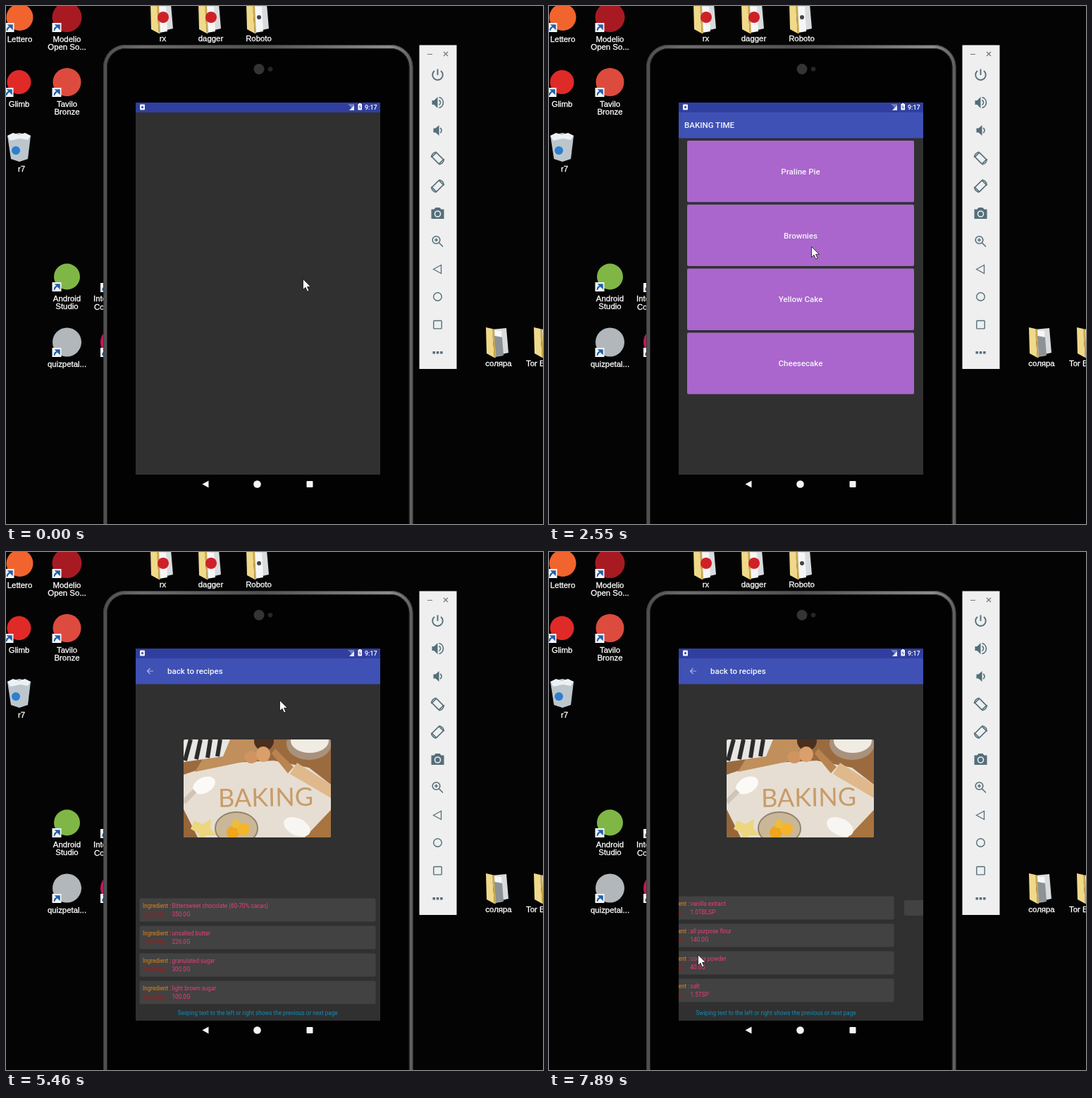
Write an HTML page that moves like this. It is 762 by 735 pixels and loops after 8000 ms.

```html
<!DOCTYPE html>
<html lang="en">
<head>
<meta charset="utf-8">
<title>Baking app in an emulator</title>
<style>
  html, body { margin: 0; width: 100%; height: 100%; overflow: hidden; background: #040404; }
  svg { display: block; }
  text { font-family: Roboto, sans-serif; }
  .mid { text-anchor: middle; }
  .label { font: 11.4px "Liberation Sans", Arial, sans-serif; fill: #fff; stroke: #fff; stroke-width: .3; }
  .title { font-size: 11.56px; font-weight: 500; fill: #f4f4f8; }
  .bold { font-weight: 700; }
  .small { font-size: 8.15px; }
  .tools { fill: none; stroke: #546e7a; stroke-width: 1.6; }
  .solid { fill: #546e7a; stroke: none; }
</style>
</head>
<body>
<svg width="762" height="735" viewBox="0 0 762 735">
  <defs>
    <linearGradient id="rim" x2="1" y2="0">
      <stop offset="0" stop-color="#505050"/><stop offset=".12" stop-color="#6c6c6c"/>
      <stop offset=".5" stop-color="#505050"/><stop offset=".93" stop-color="#8c8c8c"/><stop offset="1" stop-color="#626262"/>
    </linearGradient>
    <clipPath id="screenClip"><rect x="184" y="137" width="347" height="532"/></clipPath>
    <clipPath id="listClip"><rect x="184" y="486" width="347" height="157"/></clipPath>
    <clipPath id="photoClip"><rect x="252" y="266" width="209" height="139" rx="3"/></clipPath>
    <g id="shortcut">
      <rect width="13" height="13" fill="#f4f6f8"/>
      <path d="M3 11C3 7 5 5.500 7.500 5.500M5 3H10.500V8.500Z" fill="#1f5fa8" stroke="#1f5fa8" stroke-width="1.500"/>
    </g>
    <g id="folder">
      <path d="M8 0L29 -2L32 33L14 37Z" fill="#d9dcde"/>
      <path d="M10 1L22 2L24 37L12 39Z" fill="#f6f6f6"/>
      <path d="M0 -3L9 -1L12 40L1 34Z" fill="#f0d98a"/>
      <path d="M9 -1L12 0L14 40L12 40Z" fill="#c9a94f"/>
    </g>
  </defs>

  <rect width="762" height="735" fill="#040404"/>
  <g id="desktop"></g>

  <!-- device -->
  <rect x="140.500" y="57.500" width="434.500" height="760" rx="29" fill="#020202" stroke="url(#rim)" stroke-width="5"/>
  <rect x="143.500" y="60.500" width="428.500" height="760" rx="26" fill="none" stroke="#252525"/>
  <rect x="138.500" y="55.500" width="438.500" height="760" rx="31" fill="none" stroke="#393939"/>
  <circle cx="359" cy="89.500" r="7.500" fill="#343434"/>
  <circle cx="375" cy="89.500" r="3.300" fill="#262626"/>

  <g clip-path="url(#screenClip)">
    <rect x="184" y="137" width="347" height="18" fill="#303f9f"/>
    <g id="activity">
      <rect x="184" y="151" width="347" height="514" fill="#303030"/>
      <g id="bar">
        <rect x="184" y="151" width="347" height="36.500" fill="#3f51b5"/>
        <text id="homeTitle" class="title" x="192" y="173">BAKING TIME</text>
        <g id="backTitle">
          <path d="M209 169H200.500M204.500 165L200.500 169L204.500 173" fill="none" stroke="#a9b1dc" stroke-width="1.200"/>
          <text class="title" x="229" y="173">back to recipes</text>
        </g>
      </g>
      <g id="home"></g>
      <g id="steps"></g>
      <g id="detail">
        <g clip-path="url(#photoClip)">
          <rect x="252" y="266" width="209" height="139" fill="#e6ded3"/>
          <path d="M252 266H461V330L430 306L380 296L300 300L252 316Z" fill="#9b6b3f"/>
          <path d="M296 266H372L345 296L268 312Z" fill="#c08f5b"/>
          <path d="M252 266H318L308 290L252 298Z" fill="#e8e6e2"/>
          <path d="M262 266L254 296M276 266L270 294M290 266L286 292M304 266L300 290" stroke="#2c2b2b" stroke-width="6"/>
          <circle cx="366" cy="268" r="14" fill="#4a2f20"/>
          <ellipse cx="348" cy="291" rx="10" ry="9" fill="#cf945f"/><ellipse cx="365" cy="287" rx="10" ry="11" fill="#d9a06c"/>
          <ellipse cx="430" cy="272" rx="32" ry="23" fill="#a9927c"/><ellipse cx="431" cy="268" rx="27" ry="17" fill="#f0ebe3"/>
          <path d="M382 279L408 305L400 314L377 286Z" fill="#b98450"/>
          <path d="M413 299L461 330V349L403 315Z" fill="#dfb98b"/>
          <ellipse cx="281" cy="331" rx="17" ry="11" transform="rotate(-28 281 331)" fill="#fbfaf7"/>
          <path d="M268 339L252 355" stroke="#cfc4b6" stroke-width="7"/>
          <text x="301" y="361" font-size="36" transform="rotate(-1 365 350)" style="font-family:Lato,sans-serif" fill="#c89c68">BAKING</text>
          <path d="M461 366V405H424Z" fill="#a8743f"/><path d="M252 365L272 405H252Z" fill="#966539"/>
          <ellipse cx="413" cy="390" rx="20" ry="12" transform="rotate(25 413 390)" fill="#f8f6f3"/>
          <path d="M267 381L279 386L291 379L290 392L299 402L284 402L276 410L273 399L262 393Z" fill="#ecd680"/>
          <ellipse cx="327" cy="392" rx="30" ry="23" fill="#c9b797" stroke="#93836c" stroke-width="2"/>
          <circle cx="322" cy="398" r="9" fill="#f0a51c"/><circle cx="337" cy="393" r="9" fill="#f5b52a"/><circle cx="326" cy="386" r="6" fill="#efbb3c"/>
        </g>
        <g clip-path="url(#listClip)"><g id="ingredients"></g></g>
        <g id="pager">
          <text class="small mid" x="357" y="657" fill="#108db8">Swiping text to the left or right shows the previous or next page</text>
          <rect x="539" y="494" width="335" height="22" rx="3" fill="#424242"/>
        </g>
      </g>
    </g>
    <rect x="190" y="139.500" width="7" height="8" rx="1" fill="#eef0f8"/><circle cx="193.500" cy="143.500" r="1.500" fill="#303f9f"/>
    <path d="M485 139H494V148Z" fill="#6f7abc"/><path d="M487 148L494 141V148Z" fill="#e4e7f5"/>
    <path d="M499.500 139H501V138H503.500V139H505V147.500H499.500Z" fill="#fff"/>
    <path d="M502.500 140.500L501.300 143.500H503.300L502 146" fill="none" stroke="#303f9f" stroke-width=".8"/>
    <text x="509" y="146.500" font-size="9" font-weight="500" fill="#fff">9:17</text>
  </g>
  <g fill="#f4f4f4">
    <path d="M278.500 678.500L287.500 673.500V683.500Z"/><circle cx="356.500" cy="678.500" r="5.300"/><rect x="426.500" y="674" width="9" height="9" rx="1"/>
  </g>

  <!-- emulator controls -->
  <rect x="586.500" y="55.500" width="53" height="459.500" fill="#efefef"/>
  <path d="M598 68.500H605M621 65L627 71M627 65L621 71" stroke="#6b7a82" stroke-width="1.200"/>
  <g class="tools" transform="translate(612.500 0)">
    <path d="M-4.500 92A7.300 7.300 0 1 0 4.500 92M0 89.500V98" stroke-width="1.900"/>
    <path class="solid" d="M-8 134H-5L0 129V145L-5 140H-8Z"/>
    <path d="M2 133.500A4 4 0 0 1 2 140.500M2 129.500A7.700 7.700 0 0 1 2 144.500"/>
    <path class="solid" d="M-6 173.500H-3L2 169V184L-3 179.500H-6Z"/>
    <path d="M3.500 173A4 4 0 0 1 3.500 180"/>
    <g id="rotate">
      <rect x="-4.500" y="-7" width="9" height="14" rx="1" transform="translate(0 216) rotate(-45)"/>
      <path d="M-9 215A9 9 0 0 1 -2 207M9 217A9 9 0 0 1 2 225"/>
    </g>
    <use href="#rotate" transform="translate(0 39.500) matrix(-1 0 0 1 0 0)"/>
    <path class="solid" d="M-9 288.500H-5L-3 286H3L5 288.500H9V302H-9Z"/>
    <circle cy="295" r="4" fill="#546e7a" stroke="#efefef"/>
    <circle cx="-2" cy="332" r="5.300"/><path d="M2 336L7.500 341.500M-4.500 332H.5M-2 329.500V334.500"/>
    <path d="M-6 373.500L5 367.500V379.500Z" stroke-width="1.300"/><circle cy="412.500" r="5.800" stroke-width="1.400"/>
    <rect x="-5.700" y="446.500" width="11.400" height="11.400" rx="1" stroke-width="1.400"/>
    <path class="solid" d="M-7 490h3.500v3.500h-3.500zM-1.700 490h3.500v3.500h-3.500zM3.600 490h3.500v3.500h-3.500z"/>
  </g>

  <path id="cursor" d="M.5 .5V15.500L4 12.200L6.500 18L9 17L6.500 11.300H11.300Z" fill="#fff" stroke="#111" stroke-width=".8"/>
</svg>
<script>
const el = id => document.getElementById(id);
const show = (id, on) => el(id).style.display = on ? '' : 'none';
const text = (x, y, cls, s, fill = '#f5f5f5') => `<text x="${x}" y="${y}" class="${cls}" fill="${fill}">${s}</text>`;
const rect = (x, y, w, h, fill) => `<rect x="${x}" y="${y}" width="${w}" height="${h}" rx="2" fill="${fill}"/>`;
const use = (id, x, y) => `<use href="#${id}" x="${x}" y="${y}"/>`;
const label = (x, y, ...lines) => lines.map((s, i) => text(x, y + i * 11.5, 'label mid', s)).join('');
const disc = (x, y, r, fill) => `<circle cx="${x}" cy="${y}" r="${r}" fill="${fill}"/>`;
const app = (x, y, r, fill, ...lines) =>
  disc(x, y, r, fill) + use('shortcut', x - 21, y + 8) + label(x, y + 34.500, ...lines);

el('desktop').innerHTML =
  app(19.500, 16, 19, '#f1642d', 'Lettero') +
  app(86.500, 16, 21, '#a81a22', 'Modelio', 'Open So...') +
  app(18.500, 108, 17, '#e02a27', 'Glimb') +
  app(86.500, 108, 20, '#dd4b3e', 'Tavilo', 'Bronze') +
  app(86.500, 384, 18.500, '#80b646', 'Android', 'Studio') +
  app(86.500, 477, 20.500, '#b2b7bc', 'quizpetal...') +
  `<path d="M2 184L19 180L35 184L31 217L19 221L7 217Z" fill="#bcc6cd"/>
   <path d="M2 184L10 180L18 183L27 180L35 184L31 190L20 188L6 191Z" fill="#eef1f3"/>` +
  disc(14, 205, 6, '#2e7fd0') + label(22, 234.500, 'r7') +
  disc(154, 477, 20, '#c2185b') + use('shortcut', 134, 393) + use('shortcut', 134, 485) +
  text(124, 419, 'label', 'Inte') + text(125, 430.500, 'label', 'Co') +
  [['rx', 205], ['dagger', 273], ['Roboto', 341]].map(([name, x], i) =>
    use('folder', x, -1) + disc(x + 18, 16, i < 2 ? 8 : 3, i < 2 ? '#cf2028' : '#444') + label(x + 17.500, 50, name)).join('') +
  use('folder', 681, 459) + '<path d="M693 468L704 470L706 496L695 497Z" fill="#8d9294"/>' + label(699, 511, 'соляра') +
  use('folder', 749, 459) + text(738, 511, 'label', 'Tor Br');

el('home').innerHTML = ['Praline Pie', 'Brownies', 'Yellow Cake', 'Cheesecake'].map((s, i) =>
  rect(196, 191 + i * 90.800, 322, 87.300, '#aa66cc') + text(357, 239 + i * 90.700, 'title mid', s)).join('');

el('steps').innerHTML = ['Ingredients', 'Recipe Introduction', 'Starting prep', 'Melt butter and bittersweet chocolate.',
  'Add sugars to wet mixture.', 'Mix together dry ingredients.', 'Add eggs.', 'Add dry mixture to wet mixture.',
  'Add batter to pan.', 'Remove pan from oven.', 'Cut and serve.'].map((s, i) => {
  const y = 193.500 + i * 31.700;
  return rect(189, y, 335.500, 25.300, i ? '#424242' : '#669900') + text(356.500, y + 17.200, 'title bold mid', s);
}).join('');

el('ingredients').innerHTML = [['Bittersweet chocolate (60-70% cacao)', '350.0G'], ['unsalted butter', '226.0G'],
  ['granulated sugar', '300.0G'], ['light brown sugar', '100.0G'], ['large eggs', '5.0UNIT'],
  ['vanilla extract', '1.0TBLSP'], ['all purpose flour', '140.0G'], ['cocoa powder', '40.0G'],
  ['salt', '1.5TSP'], ['semisweet chocolate chips', '350.0G']].map(([name, amount], i) => {
  const y = 491.500 + i * 39;
  return rect(189.500, y, 335, 33, '#424242') +
    text(194, y + 13.700, 'small', 'Ingredient :', '#e08318') + text(235.500, y + 13.700, 'small', name, '#e83e7c') +
    text(194, y + 25.700, 'small', 'Quantity :', '#b01616') + text(235.500, y + 25.700, 'small', amount, '#e83e7c');
}).join('');

const refreshes = [[0, 0, 1], [150, 1130, 8], [1250, 2150, 7], [3140, 3830, 6], [4100, 4100, 1],
  [5460, 5460, 1], [5770, 6740, 8], [6890, 7890, 8]].flatMap(([a, b, n]) =>
  Array.from({ length: n }, (_, i) => Math.round(a + (b - a) * i / Math.max(1, n - 1))));

const cursorPath = [[0, 421, 387], [700, 405, 440], [1130, 372, 385], [1400, 369, 370], [2150, 372, 341],
  [3140, 372, 341], [3830, 373, 259], [4100, 388, 210], [5630, 388, 210], [6324, 430, 626], [6890, 423, 442],
  [7040, 421, 428], [7180, 418, 391], [7600, 262, 574], [7750, 246, 572], [7890, 211, 571]];
const scrollPath = [[6324, 0], [6890, 185.500], [7040, 198]];
const swipePath = [[7600, 0], [7890, 35]];

// Linear interpolation through [time, ...values] keys.
function along(keys, t) {
  const next = keys.findIndex(k => k[0] > t);
  if (next <= 0) return keys.at(next).slice(1);
  const a = keys[next - 1], b = keys[next], p = (t - a[0]) / (b[0] - a[0]);
  return a.slice(1).map((v, i) => v + (b[i + 1] - v) * p);
}
const move = (id, x, y) => el(id).setAttribute('transform', `translate(${x} ${y})`);

function draw(now) {
  const t = refreshes.findLast(r => r <= now % 8000) ?? 0;
  const inRecipe = t >= 3140, opening = inRecipe && t < 3270;
  show('bar', t >= 150);
  show('homeTitle', !inRecipe);
  show('backTitle', inRecipe);
  show('home', t >= 1250 && !inRecipe);
  show('steps', inRecipe && !opening && t < 5460);
  show('detail', t >= 5460);
  move('activity', 0, opening ? 4 : 0);
  const [scroll] = along(scrollPath, t), [swipe] = along(swipePath, t);
  move('ingredients', -swipe, -scroll);
  move('pager', -swipe, 0);
  move('cursor', ...along(cursorPath, t));
}

const start = performance.now();
(function loop() {
  draw(performance.now() - start);
  requestAnimationFrame(loop);
})();
</script>
</body>
</html>
```
